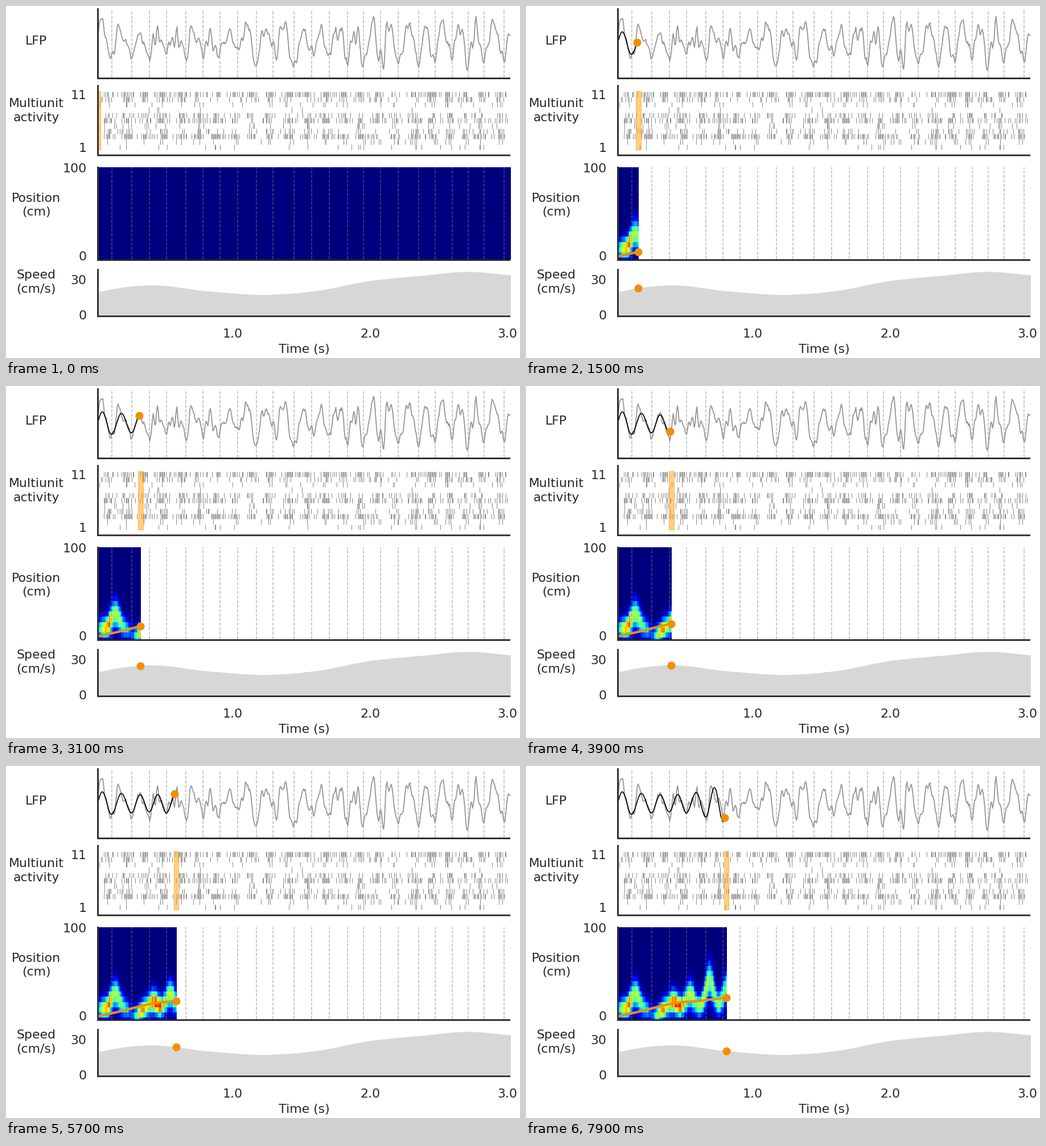
These frames come from a looping animation (903 px wide and 620 px high, 8000 ms). A matplotlib script:

```python
import numpy as np
import matplotlib.pyplot as plt
from matplotlib.animation import FuncAnimation
from matplotlib.patches import Rectangle

W, H, DPI = 903, 620, 64
PT = 72 / DPI  # points per pixel
FRAMES, INTERVAL = 80, 100
X0, STEP = 161.2, 2.414
LEFT, RIGHT = 162.6, 886
INK, ORANGE = "#262626", "#f28e04"

# Theta troughs mark the cycle borders
TROUGHS = np.array([185.5, 220.5, 251.5, 281.5, 315.5, 346, 376, 407, 440, 469,
                    505.5, 537, 567.5, 599.5, 627.5, 658, 689, 724.5, 753.5,
                    783.5, 812, 839.5, 875])

plt.rcParams["font.family"] = "DejaVu Sans"
rng = np.random.default_rng(11)


def smooth(x, pts):
    """Cubic Hermite curve through a few points."""
    xs, ys = np.array(pts, float).T
    m = np.gradient(ys, xs)
    i = np.clip(np.searchsorted(xs, x) - 1, 0, len(xs) - 2)
    h = xs[i + 1] - xs[i]
    t = (x - xs[i]) / h
    return ((1 + 2 * t) * (1 - t) ** 2 * ys[i] + t * (1 - t) ** 2 * h * m[i]
            + t * t * (3 - 2 * t) * ys[i + 1] + t * t * (t - 1) * h * m[i + 1])


def wave(x, shift=0):
    """Theta rhythm: 1 at each trough, -1 halfway between."""
    phase = np.interp(x, np.r_[153, TROUGHS, 906], np.arange(len(TROUGHS) + 2))
    return np.cos(2 * np.pi * (phase + shift))


def theta_y(x):
    size = np.interp(x, [162, 245, 290, 331, 361], [21, 14.5, 17, 28, 36])
    return 66 + size * wave(x)


def track_y(x):
    return smooth(x, [(161, 441.2), (200, 432.5), (240, 422), (275, 416),
                      (299, 414.3), (330, 410.5), (354, 407.8)])


def speed_y(x):
    return smooth(x, [(162, 504), (205, 496), (252, 492), (352, 502.3),
                      (460, 508.8), (545, 502), (640, 484.3), (730, 475.3),
                      (812, 468.4), (887, 474.3)])


fig = plt.figure(figsize=(W / DPI, H / DPI), dpi=DPI, facecolor="white")
ax = fig.add_axes([0, 0, 1, 1])
ax.set_xlim(0, W)
ax.set_ylim(H, 0)
ax.axis("off")


def clip(artist, top=0, bottom=H):
    box = Rectangle((LEFT, top), RIGHT - LEFT, bottom - top, transform=ax.transData)
    artist.set_clip_path(box)
    return artist


def line(x=(), y=(), color=INK, width=1.5, z=3, **kw):
    return ax.plot(x, y, color=color, lw=width * PT, zorder=z, **kw)[0]


def label(x, base, text, ha="center"):
    ax.text(x, base, text, size=22 * PT, color=INK, ha=ha, va="baseline")


# Axes frames and labels
for top, bottom in [(4, 127.5), (139, 263), (283, 447.5), (463, 546.5)]:
    line([161.5, 161.5, RIGHT], [top, bottom, bottom], width=2.8, z=2.5,
         snap=False, solid_joinstyle="miter", solid_capstyle="butt")

for base, text in [(68, "LFP"), (178.5, "Multiunit"), (203, "activity"),
                   (345, "Position"), (369.5, "(cm)"),
                   (480.5, "Speed"), (505, "(cm/s)")]:
    label(53, base, text)
for base, text in [(163.5, "11"), (257, "1"), (293, "100"), (448, "0"),
                   (490.5, "30"), (552, "0")]:
    label(141.5, base, text, "right")
for x, text in [(398, "1.0"), (640, "2.0"), (880.5, "3.0")]:
    label(x, 583.5, text)
label(523.5, 610.5, "Time (s)")

for x in TROUGHS:
    for bottom, top in [(126, 5.5), (446, 284)]:
        line([x, x], [bottom, top], "#808080", 1.5, 2, ls="--", alpha=0.55)

# Raw LFP: theta rhythm of varying size plus correlated noise
lx = np.arange(162.5, 886, 1.5)
size = np.interp(lx, TROUGHS, rng.uniform(18, 34, len(TROUGHS)))
noise = np.convolve(rng.normal(0, 10, lx.size), [0.4, 0.8, 0.7, 0.4], "same")
lfp = np.clip(64 + size * wave(lx) + noise, 10, 122)
line(lx, lfp, "#969696", 1.8, 2.2, solid_joinstyle="round")

# Spike raster: mean spikes per cycle for each unit, fired just before troughs
sx = np.arange(164, 884, 1.5)
burst = np.exp(0.9 * wave(sx, 0.22))
burst /= burst.sum()
for row, count in enumerate([9, 5, 2, 0.6, 5.5, 8, 2, 5, 9, 2, 0.9]):
    chance = count * len(TROUGHS) * burst
    spikes = sx[rng.random(sx.size) < chance]
    mid = 155.2 + 9.3 * row
    ax.vlines(spikes, mid - 4.7, mid + 4.7, color="#7c7c7c", lw=0.9 * PT, zorder=2.2)

# Running speed
vx = np.linspace(LEFT, RIGHT, 300)
clip(ax.fill_between(vx, speed_y(vx), 543.5, color="#d7d7d7", lw=PT, zorder=1))

# Decoded position: sweeps ahead after each trough, then falls back
ROW, ROWS, ROW_TOP = 9.05, 19, 279.8
cx = X0 + STEP * (np.arange(FRAMES) + 0.5)
cy = ROW_TOP + ROW * (np.arange(ROWS)[:, None] + 0.5)
lift = sum(reach * np.exp(-((cx - x - 6) / 10) ** 2)
           for x, reach in zip(TROUGHS, [26, -14, 12, 25, 50, 36]))
power = np.interp(cx, [163, 180, 190, 204, 221, 236, 252, 266, 280, 352],
                  [0.4, 0.9, 0.55, 0.5, 0.2, 0.8, 0.55, 0.9, 0.55, 0.55])
power *= 1 + 0.1 * rng.normal(size=FRAMES)
spread = 11 + 0.2 * np.maximum(lift, 0)
heat = np.clip(power * np.exp(-0.5 * ((cy - 427 + lift) / spread) ** 2), 0, 1)

im = ax.imshow(heat, cmap="jet", vmin=0, vmax=1, aspect="auto",
               interpolation="nearest", zorder=1)
clip(im, 284, 447)

# Moving parts
window = clip(ax.add_patch(Rectangle((0, 149.8), 8.6, 103.4, fc="#ff9f0c",
                                     ec="#ff9f0c", lw=1.4 * PT, alpha=0.5,
                                     zorder=4)))
theta = clip(line(color="black", width=1.7, z=4))
track = clip(line(color=ORANGE, width=4.2, z=4, solid_capstyle="butt"))
dots = clip(line(color=ORANGE, z=5, ls="", marker="o", ms=14 * PT, mew=0))


def show_heat(data, right):
    im.set_data(data)
    im.set_extent((X0, right, ROW_TOP + ROW * ROWS, ROW_TOP))


def draw(n):
    x = X0 + STEP * n
    window.set_x(x - 4.1)
    if n == 0:
        show_heat(np.zeros((ROWS, 1)), RIGHT)
        for artist in (theta, track, dots):
            artist.set_data([], [])
    else:
        show_heat(heat[:, :n], x)
        px = np.linspace(X0, x, 6 * n + 1)
        theta.set_data(px - STEP, theta_y(px - STEP))
        track.set_data(px, track_y(px))
        dots.set_data([x - STEP, x, x],
                      [theta_y(x - STEP), track_y(x), speed_y(x)])
    return im, window, theta, track, dots


anim = FuncAnimation(fig, draw, frames=FRAMES, interval=INTERVAL,
                     repeat=True, repeat_delay=0, blit=False)
plt.show()
```
